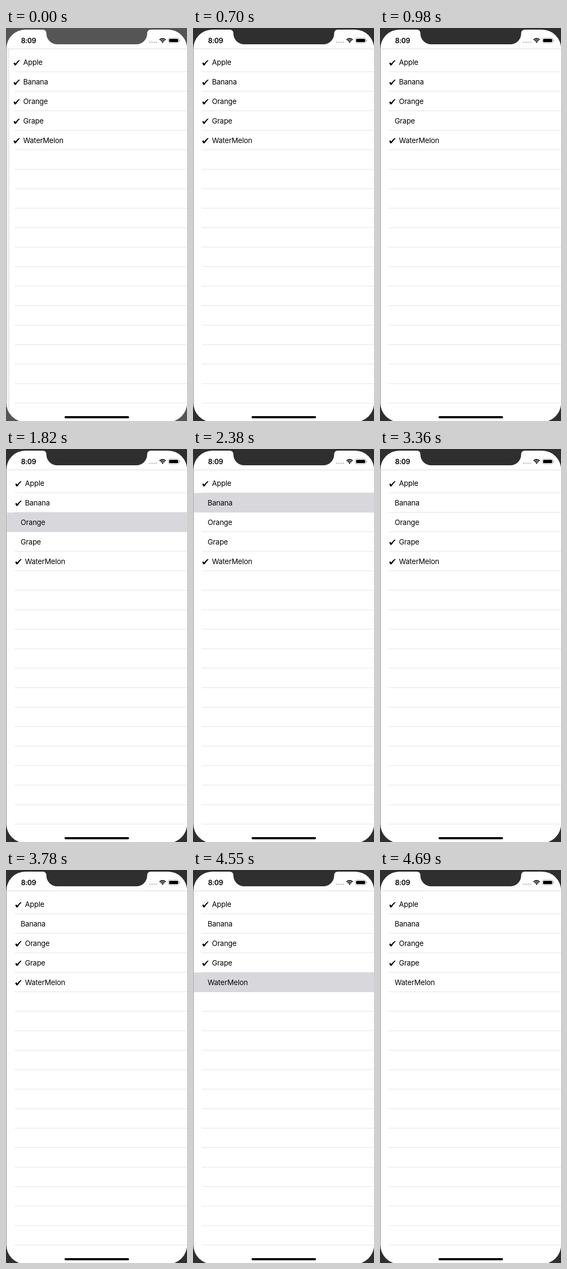
An HTML page with a canvas for the animation above (5460 ms loop, 334 by 724 pixels).

```html
<!DOCTYPE html>
<html lang="en">
<head>
<meta charset="utf-8">
<title>Fruit checklist</title>
<style>
  html, body { margin: 0; width: 100%; height: 100%; overflow: hidden; background: #fff; }
  canvas { display: block; width: 334px; height: 724px; }
</style>
</head>
<body>
<canvas id="stage"></canvas>
<script>
const W = 334, H = 724, LOOP = 5460;
const FONT = 'Inter, "Liberation Sans", sans-serif';
const FRUITS = ['Apple', 'Banana', 'Orange', 'Grape', 'WaterMelon'];

// Each tap toggles its row at `down` and keeps it highlighted until `up`.
const TAPS = [
  { row: 3, down: 840, up: 980 },
  { row: 2, down: 1820, up: 1960 },
  { row: 1, down: 2380, up: 2520 },
  { row: 3, down: 3220, up: 3360 },
  { row: 2, down: 3710, up: 3780 },
  { row: 4, down: 4550, up: 4690 }
];
const SETTLE = 70, DARKEN = 700;
const TOP = 2.9, NOTCH_BOTTOM = 30, PITCH = 35.9;

const canvas = document.getElementById('stage');
const ctx = canvas.getContext('2d');
const dpr = window.devicePixelRatio || 1;
canvas.width = W * dpr;
canvas.height = H * dpr;

const lineY = k => 80.2 + PITCH * k;

function rect(x, y, w, h, color) {
  ctx.fillStyle = color;
  ctx.fillRect(x, y, w, h);
}

function pill(x, y, w, h, r, color) {
  ctx.fillStyle = color;
  ctx.beginPath();
  ctx.roundRect(x, y, w, h, r);
  ctx.fill();
}

function text(str, x, y, size, weight, spacing) {
  ctx.font = `${weight} ${size}px ${FONT}`;
  ctx.letterSpacing = spacing + 'px';
  ctx.fillStyle = '#000';
  ctx.fillText(str, x, y);
}

function check(x, y) {
  ctx.save();
  ctx.translate(x, y);
  ctx.fillStyle = '#000';
  ctx.beginPath();
  ctx.moveTo(0, 6);
  ctx.quadraticCurveTo(1.6, 4.2, 2.8, 4.8);
  ctx.quadraticCurveTo(3.5, 5.2, 3.9, 6.6);
  ctx.quadraticCurveTo(6.4, 2.6, 9.6, 0.4);
  ctx.quadraticCurveTo(11, -0.3, 11.7, 0.7);
  ctx.quadraticCurveTo(7.8, 4.2, 5, 8.9);
  ctx.quadraticCurveTo(3.7, 10.2, 2.1, 9.8);
  ctx.quadraticCurveTo(1.4, 7.6, 0, 6);
  ctx.fill();
  ctx.restore();
}

function wifi(x, y) {
  const a = Math.PI * 0.25;
  ctx.fillStyle = ctx.strokeStyle = '#000';
  ctx.lineWidth = 1.9;
  for (const r of [8, 5.1]) {
    ctx.beginPath();
    ctx.arc(x, y, r, -Math.PI + a, -a);
    ctx.stroke();
  }
  ctx.beginPath();
  ctx.moveTo(x, y);
  ctx.arc(x, y, 3.1, -Math.PI + a, -a);
  ctx.fill();
}

function statusBar() {
  text('8:09', 27.7, 27.9, 12.8, 600, -0.3);
  for (let i = 0; i < 4; i++) pill(263.9 + i * 4.05, 24.8, 3, 3, 1.5, '#cbcbcb');
  wifi(289, 27.5);
  ctx.strokeStyle = '#a6a6a6';
  ctx.lineWidth = 0.9;
  ctx.beginPath();
  ctx.roundRect(299.6, 18.5, 19.4, 9, 2.6);
  ctx.stroke();
  pill(301, 19.9, 16.6, 6.2, 1.5, '#000');
  pill(320, 21.5, 1.2, 3, 0.6, '#a6a6a6');
}

function list(t) {
  const checked = FRUITS.map(() => true);
  let lit = -1;
  for (const tap of TAPS) {
    if (t < tap.down) break;
    checked[tap.row] = !checked[tap.row];
    if (t < tap.up) lit = tap.row;
  }

  rect(0, 38, W, 1, '#dcdcdc');
  for (let k = 0; k < 18; k++) rect(16, lineY(k), W - 16, 1, '#e3e3e4');
  if (lit >= 0) {
    const top = Math.round(lineY(lit - 1)) + 1;
    rect(0, top, W, Math.round(lineY(lit)) + 1 - top, '#d8d8dc');
  }

  const shift = t < SETTLE ? -3.2 : 0;
  FRUITS.forEach((name, i) => {
    const base = 68.4 + PITCH * i;
    if (checked[i]) check(17 + shift, base - 9.3);
    text(name, (checked[i] ? 35 : 27) + shift, base, 13.3, 400, -0.17);
  });
}

function edgeShadow() {
  const g = ctx.createLinearGradient(1, 0, 6.5, 0);
  g.addColorStop(0, '#f6f6f6');
  g.addColorStop(1, '#ebebeb');
  rect(1, 39, 5.5, H - 39, g);
}

// The screen runs slightly past the lower edge of the stage.
function screenPath() {
  ctx.beginPath();
  ctx.roundRect(0.6, TOP, W - 0.4, H + 2 - TOP, 35.5);
}

function notch(color) {
  const l = 74.5, r = 260.5, flare = 6.5;
  ctx.fillStyle = color;
  ctx.beginPath();
  ctx.moveTo(l - flare, 0);
  ctx.lineTo(l - flare, TOP);
  ctx.arcTo(l, TOP, l, TOP + flare, flare);
  ctx.arcTo(l, NOTCH_BOTTOM, l + 20, NOTCH_BOTTOM, 20);
  ctx.arcTo(r, NOTCH_BOTTOM, r, NOTCH_BOTTOM - 20, 20);
  ctx.arcTo(r, TOP, r + flare, TOP, flare);
  ctx.lineTo(r + flare, 0);
  ctx.fill();
}

function draw(t) {
  const frame = t < DARKEN ? '#555' : '#2f2f2f';
  ctx.setTransform(dpr, 0, 0, dpr, 0, 0);
  rect(0, 0, W, H, frame);
  ctx.save();
  screenPath();
  ctx.clip();
  rect(0, 0, W, H, '#fff');
  if (t < SETTLE) edgeShadow();
  list(t);
  statusBar();
  pill(108, 715.1, 119, 4, 2, '#000');
  ctx.restore();
  notch(frame);
}

const start = performance.now();
function tick() {
  draw((performance.now() - start) % LOOP);
  requestAnimationFrame(tick);
}
tick();
</script>
</body>
</html>
```
